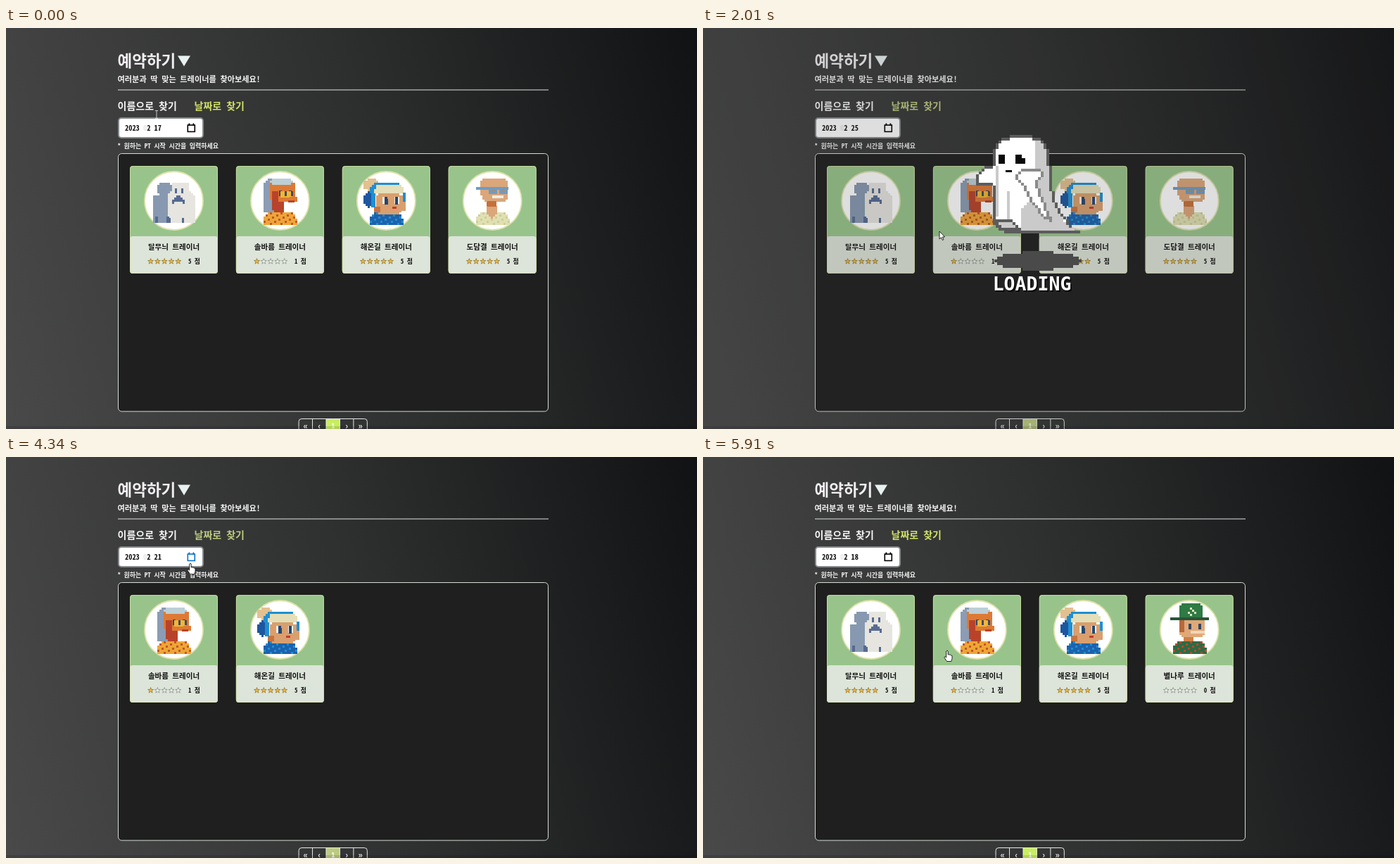
An HTML page for the animation above (6.04 s loop, 982x570 px).

```html
<!DOCTYPE html>
<html lang="ko">
<head>
<meta charset="utf-8">
<title>예약하기</title>
<style>
html, body { margin: 0; width: 100%; height: 100%; overflow: hidden; background: #2e302f; }
svg {
  display: block; width: 982px; height: 570px;
  background: linear-gradient(75deg, #494949 0%, #2e302f 53%, #111214 100%);
  font-family: 'Noto Sans Mono CJK KR', 'Noto Sans CJK KR', 'Noto Sans CJK', monospace;
}
text { white-space: pre; }
.cal { font-family: 'Noto Sans CJK KR', 'Noto Sans CJK', sans-serif; }
.load { font-family: 'DejaVu Sans Mono', monospace; font-weight: bold; }
.mid { text-anchor: middle; }
.bold { font-weight: bold; }
.px { shape-rendering: crispEdges; }
</style>
</head>
<body>
<svg viewBox="0 0 982 570"><defs id="art"></defs><g id="stage"></g></svg>
<script>
const LOOP = 6040, FRAME = 70;
const stage = document.getElementById('stage');

// --- drawing helpers ---
const rect = (x, y, w, h, fill, more = '') =>
  `<rect x="${x}" y="${y}" width="${w}" height="${h}" fill="${fill}" ${more}/>`;
const path = (d, fill, more = '') => `<path d="${d}" fill="${fill}" ${more}/>`;
const group = (x, y, body, more = '') => `<g transform="translate(${x} ${y})" ${more}>${body}</g>`;
const use = (id, x = 0, y = 0) => `<use href="#${id}" x="${x}" y="${y}"/>`;
// y is the visual middle of the line
const text = (x, y, s, size, fill, cls = 'bold') =>
  `<text x="${x}" y="${y + size * 0.37}" font-size="${size}" fill="${fill}" class="${cls}">${s}</text>`;

// --- pixel art: smooth outlines snapped to a grid ---
const probe = document.createElement('canvas').getContext('2d');
const box = (x, y, w, h) => `M${x} ${y}h${w}v${h}h${-w}z`;
const oval = (x, y, rx, ry) => `M${x - rx} ${y}a${rx} ${ry} 0 1 1 ${2 * rx} 0a${rx} ${ry} 0 1 1 ${-2 * rx} 0z`;
const slab = (x, y, w, h) => box(x, y + 3, w, h - 6) + box(x + 3, y, w - 6, h);

function pixels(d, fill, { size = 3, edge = fill, keep = () => true } = {}) {
  const shape = new Path2D(d);
  const inside = (i, j) => probe.isPointInPath(shape, (i + 0.5) * size, (j + 0.5) * size);
  const body = { [fill]: '', [edge]: '' };
  for (let j = 0; j * size < 160; j++) {
    for (let i = 0; i * size < 160; i++) {
      if (!inside(i, j) || !keep(i, j)) continue;
      const core = inside(i - 1, j) && inside(i + 1, j) && inside(i, j - 1) && inside(i, j + 1);
      body[core ? fill : edge] += box(i * size, j * size, size, size);
    }
  }
  return Object.entries(body).map(([color, cells]) => path(cells, color)).join('');
}

const pair = (x, gap, y, w, h, fill) => path(box(x, y, w, h) + box(x + gap, y, w, h), fill);
const every = n => (i, j) => (i + 2 * j) % n === 0;

function bust({ skin, neck, shirt, fleck, low = 0 }) {
  const torso = 'M39 84Q36 66 54 66H72Q88 66 86 84Z';
  return path(box(54, 46, 14, 22), neck) +
    pixels(torso, shirt) + pixels(torso, fleck, { keep: every(5) }) +
    pixels(slab(48, 21 + low, 36, 30), skin) +
    pair(61, 14, 35 + low * 0.7, 4, 8, '#354560');
}

const ART = {
  grey: pixels(slab(39, 23, 21, 18) + box(33, 42, 24, 39), '#8799b0') +
    pixels('M53 81V39L60 36V25H84V36L93 42V81Z', '#e7e5e0') +
    pair(64, 9, 32, 3, 7, '#566b92') +
    pixels('M60 54V48L69 42L78 48V54L69 50Z', '#566b92') +
    pair(36, 16, 72, 4, 9, '#566b92') + pair(55, 19, 74, 3, 7, '#566b92'),

  ponytail: pixels('M39 66V24L48 18H60V66Z', '#8b9cb4') +
    bust({ skin: '#dd7a35', neck: '#b8432a', shirt: '#eda636', fleck: '#c4552b' }) +
    pixels(box(51, 36, 9, 27), '#b8432a') +
    pixels(slab(48, 18, 33, 9), '#bccfd6') +
    path(box(63, 36, 17, 9), '#f2b632') + pair(69, 9, 36, 3, 7, '#3f4a63') +
    path(box(76, 44, 11, 7), '#dd7a35') + path(box(74, 49, 9, 3), '#b8432a'),

  headset: pixels(oval(41, 27, 11, 9), '#e3c090') +
    bust({ skin: '#d99f6e', neck: '#c9743f', shirt: '#1c62ad', fleck: '#1f8fd2', low: 17 }) +
    path(box(83, 42, 7, 22), '#d99f6e') + path(box(45, 58, 9, 8), '#c9743f') +
    pixels('M45 42V30L51 24H81L87 33V39H51Z', '#e4dfb8') +
    pixels('M39 40V31L45 25H80V28H48L43 40Z', '#1f8fd2') +
    pixels(oval(38, 48, 8, 11), '#1c57a0') + path(box(41, 39, 6, 20) + box(86, 38, 4, 13), '#1f8fd2') +
    pair(57, 17, 44, 7, 10, '#f4efe6') + pair(60, 15, 44, 4, 11, '#24466f') +
    path(box(71, 58, 6, 3), '#c83a32'),

  glasses: bust({ skin: '#dba67a', neck: '#c4703a', shirt: '#dfe0b2', fleck: '#cfcd98' }) +
    pixels(slab(45, 18, 40, 28), '#dba67a') +
    pixels('M54 66V57H69V66L62 75Z', '#dba67a') + path(box(55, 50, 13, 8), '#c4703a') +
    path(box(39, 30, 46, 4), '#6f9cc4') + pair(57, 15, 30, 12, 10, '#6f9cc4') +
    pair(60, 15, 33, 6, 4, '#9c917f') + path(box(62, 42, 16, 4), '#f0ece0'),

  cap: bust({ skin: '#e0a878', neck: '#cf8046', shirt: '#2f6a42', fleck: '#b8482e', low: 8 }) +
    path(box(48, 36, 7, 17), '#b8683a') + path(box(64, 51, 20, 4), '#f0d6b8') +
    pixels(slab(47, 13, 33, 22), '#2f7a45') + path(box(35, 32, 55, 4), '#27553a') +
    pixels(oval(68, 24, 7, 7), '#dfe6c0', { keep: every(3) }),

  ghost: pixels('M28 44V24Q34 0 70 0Q106 0 109 34L114 80Q120 114 153 140H46L28 128V72H2Q2 46 28 44Z',
      '#fff', { size: 4, edge: '#5c5c5c' }) +
    pixels('M88 6Q103 10 105 36L110 82Q116 114 144 135H68V104Q94 90 88 48Z', '#c9cac9', { size: 4 }) +
    pixels(box(32, 44, 4, 72) + box(48, 82, 4, 36), '#c9cac9', { size: 4 }) +
    pixels('M60 60Q66 46 84 47Q99 46 99 60Q90 62 92 72Q104 100 113 126Q92 116 68 70Z',
      '#fff', { size: 4, edge: '#8a8a8a' }) +
    pixels('M28 120H56L68 136H40Z', '#c9cac9', { size: 4, edge: '#5c5c5c' }) +
    pair(36, 24, 28, 9, 13, '#0a0a0a') + path(box(66, 33, 8, 8) + box(46, 50, 9, 3), '#0a0a0a'),

  shade: pixels(oval(62, 14, 62, 13), '#4a4a4a', { size: 4 })
};
document.getElementById('art').innerHTML = Object.entries(ART)
  .map(([id, body]) => `<g id="${id}" class="px">${body}</g>`).join('');

const trainer = (name, art, stars) => ({ name, art, stars });
const A = trainer('달무늬', 'grey', 5);
const B = trainer('솔바름', 'ponytail', 1);
const C = trainer('해온길', 'headset', 5);
const D = trainer('도담결', 'glasses', 5);
const E = trainer('별나루', 'cap', 0);

// --- timeline: each round opens the calendar, picks a day, then loads a list ---
const START = { day: 17, list: [A, B, C, D] };
const ROUNDS = [
  { open: 660, pick: 1940, done: 2490, day: 25, list: [] },
  { open: 3020, pick: 3800, done: 4340, day: 21, list: [B, C] },
  { open: 4750, pick: 5630, done: 5910, day: 18, list: [A, B, C, E] }
];
const ICON = [268, 143];
const MOVES = [
  { from: 70, to: 400, via: [[214, 123], ICON] },
  { from: 1060, to: 1660, via: [ICON, [322, 272], [339, 309], [336, 299]] },
  { from: 1730, to: 1800, via: [[336, 299], [336, 289]] },
  { from: 2560, to: 2950, via: [[336, 289], [318, 337], ICON] },
  { from: 3170, to: 3720, via: [ICON, [297, 311], [200, 291]] },
  { from: 3870, to: 4340, via: [[200, 291], [262, 151]] },
  { from: 4410, to: 4550, via: [[262, 151], [262, 145]] },
  { from: 4820, to: 5300, via: [[262, 145], [424, 322], [347, 275]] }
];

function stateAt(t) {
  const s = { ...START, open: false, busy: false, click: false, since: 0 };
  for (const r of ROUNDS) {
    const load = r.pick + FRAME;
    if (t >= load) s.day = r.day;
    if (t >= r.done) s.list = r.list;
    if (t >= load && t < r.done) { s.busy = true; s.since = t - load; }
    s.open ||= t >= r.open + FRAME && t < load;
    s.click ||= [r.open, r.pick].some(c => t >= c && t < c + FRAME);
  }
  return s;
}

function pointer(t) {
  const move = MOVES.filter(m => t >= m.from).pop();
  if (!move) return MOVES[0].via[0];
  const { from, to, via } = move;
  const last = Math.round((to - from) / FRAME);
  const step = Math.min(last, Math.floor((t - from) / (to - from) * last));
  const u = (step + 1) / (last + 1) * (via.length - 1);
  const i = Math.min(via.length - 2, Math.floor(u));
  return via[i].map((v, k) => +(v + (via[i + 1][k] - v) * (u - i)).toFixed(1));
}

// --- page parts ---
function header(accent) {
  return text(158.5, 46.5, '예약하기', 22.5, '#f1eef2') +
    path('M244 39.5H262L253 54.5Z', '#e8f0f0') +
    text(158.5, 73, '여러분과 딱 맞는 트레이너를 찾아보세요!', 11.2, '#f4f4f4') +
    rect(159, 87.5, 612, 1, '#dfe3e1') +
    text(158.5, 111, '이름으로 찾기', 14, '#f6f6f6') +
    text(267.5, 111, '날짜로 찾기', 14, accent) +
    text(158.5, 168, '* 원하는 PT 시작 시간을 입력하세요', 9, '#f4f4f4');
}

function dateField(day, hot) {
  const ink = hot ? '#0b72cc' : '#000';
  return rect(160, 128, 120, 28, '#fff', 'rx="4" stroke="#858a8d" stroke-width="2"') +
    text(169, 142, `2023 <tspan fill="#e6e6e6">0</tspan>2 ${day}`, 10.4, '#111') +
    rect(258.3, 138, 10, 9.4, 'none', `stroke="${ink}" stroke-width="1.6"`) +
    pair(259.5, 6, 135.6, 1.8, 3, ink);
}

const starPath = Array.from({ length: 10 }, (_, i) => {
  const r = i % 2 ? 1.7 : 4.2, a = i * Math.PI / 5;
  return (i ? 'L' : 'M') + (r * Math.sin(a)).toFixed(2) + ' ' + (-r * Math.cos(a)).toFixed(2);
}).join('') + 'Z';

function card({ name, art, stars }, i) {
  let out = rect(0, 0, 125, 153, '#98c48b', 'rx="4"') +
    rect(0, 100, 125, 53, '#dde4d9', 'rx="4"') +
    rect(0.5, 0.5, 124, 152, 'none', 'rx="4" stroke="#d6dda4" stroke-width=".8"') +
    `<circle cx="62.5" cy="49.5" r="41.5" fill="#fff" stroke="#dde2aa" stroke-width="1.8"/>` +
    use(art) + text(62.5, 115, name + ' 트레이너', 10.55, '#111', 'mid bold');
  for (let s = 0; s < 5; s++) {
    const on = s < stars;
    out += group(29.6 + s * 9.8, 135.8, path(starPath, on ? '#f0b73c' : '#eef2ea',
      `stroke="${on ? '#86702f' : '#7d857c'}" stroke-width=".7"`));
  }
  return group(176 + i * 150.9, 196, out + text(83, 135.5, stars + ' 점', 8.85, '#111'));
}

function pager(full, accent) {
  const labels = full ? ['«', '‹', '1', '›', '»'] : ['«', '‹', '›', '»'];
  const w = 19.45, x0 = 464.7 - labels.length * w / 2;
  let out = '';
  labels.forEach((s, i) => {
    const x = x0 + i * w;
    if (s === '1') out += rect(x, 555, w, 20, accent);
    if (i) out += rect(x - 0.5, 555, 1, 20, '#e6eae8');
    out += text(x + w / 2, 565.5, s, s === '1' ? 9.5 : 12, '#fff', 'mid bold cal');
  });
  return out + rect(x0, 555.5, labels.length * w, 24, 'none', 'rx="4" stroke="#e6eae8"');
}

// --- calendar ---
const CAL = { x: 161.5, y: 212, w: 32.4, h: 23.4 };

function cellAt(x, y) {
  const c = Math.floor((x - CAL.x) / CAL.w), r = Math.floor((y - CAL.y) / CAL.h);
  const i = r * 7 + c;
  return c >= 0 && c < 7 && r >= 0 && r < 5 && i >= 18 ? i : -1;
}

function calendar(day, x, y) {
  const hover = cellAt(x, y);
  const overLabel = x > 219 && x < 331 && y > 155 && y < 184;
  let out = rect(161, 155, 227.5, 174.5, '#fff') + rect(161, 155, 58, 29, '#f0f0f0');
  if (overLabel) out += rect(219, 155, 112, 29, '#e6e6e6');
  out += text(274.5, 170.5, '2023년 2월', 9, '#111', 'mid cal');
  ['«', '‹', '›', '»'].forEach((s, i) =>
    out += text(176 + i * 28.6 + (i > 1 ? 112 : 0), 170.5, s, 9.5, i < 2 ? '#a9a9a9' : '#111', 'mid cal'));
  [...'월화수목금토일'].forEach((s, i) =>
    out += text(CAL.x + (i + 0.5) * CAL.w, 203.5, s, 7.6, '#dcdcdc', 'mid cal'));
  for (let i = 0; i < 35; i++) {
    const d = i - 1;
    const label = d < 1 ? 31 + d : d > 28 ? d - 28 : d;
    const cx = CAL.x + i % 7 * CAL.w, cy = CAL.y + Math.floor(i / 7) * CAL.h;
    const past = d < 17, weekend = i % 7 > 4;
    let bg = past ? '#f0f0f0' : '', ink = '#111';
    if (d < 1 || d > 28) ink = '#757575';
    else if (weekend) ink = '#b02222';
    else if (past) ink = '#b6b6b6';
    if (d === START.day) bg = '#ffff76';
    if (i === hover) bg = '#e6e6e6';
    if (d === day) { bg = '#006edc'; ink = '#fff'; }
    if (bg) out += rect(cx, cy, CAL.w, CAL.h, bg, 'class="px"');
    out += text(cx + CAL.w / 2, cy + 11.7, String(label).padStart(2, '0'), 9, ink, 'mid cal');
  }
  return out + rect(161.2, 155.2, 227.2, 174.2, 'none', 'stroke="#a0a096" stroke-width=".8"');
}

function loading(since) {
  const lift = Math.floor(since / (2 * FRAME)) % 2 ? 3 : 0;
  return rect(0, 0, 982, 570, '#313131', 'opacity=".16"') +
    use('shade', 414, 317) + use('ghost', 384, 152 - lift) +
    text(469, 365, 'LOADING', 26.5, '#000', 'mid load') +
    text(467.5, 363.2, 'LOADING', 26.5, '#fff', 'mid load');
}

// --- pointer shapes, hot spot at 0 0 ---
const edged = 'stroke="#111" stroke-width=".9" stroke-linejoin="round"';
const SHAPES = {
  arrow: path('M0 0V11L2.6 8.7L4.3 12.5L6 11.7L4.4 8H7.6Z', '#fff', edged),
  hand: path('M-1.3 1Q0 -.8 1.2 1V6Q2.2 5 3.2 6.2Q4.4 5.5 5.2 6.8Q6.8 6.3 7 8V11.5L5.8 15.5H-.4L-3.8 10.6Q-4.4 8.6 -2.8 8.7L-1.3 10Z', '#fff', edged),
  beam: path('M-2.2 -5.5H2.2M0 -5.5V5.5M-2.2 5.5H2.2', 'none', 'stroke="#c4c8c6" stroke-width="1"')
};

function shapeAt(x, y, onIcon, { open, busy, list }) {
  const col = (x - 176) / 150.9;
  const onCard = !open && !busy && y > 196 && y < 349 && col > 0 && col < list.length && col % 1 < 0.83;
  if (onIcon || onCard || open && cellAt(x, y) >= 0) return 'hand';
  return x > 159 && x < 281 && y > 116 && y < 157 ? 'beam' : 'arrow';
}

function scene(t) {
  const [x, y] = pointer(t);
  const s = stateAt(t);
  const dull = s.busy || s.list.length === 2;
  const onIcon = x > 254 && x < 277 && y > 133 && y < 154;

  return header(dull ? '#bccb80' : '#d2e268') +
    rect(159.5, 178.5, 611, 366.5, '#1e1f1e', 'rx="5" stroke="#d5dcd6"') +
    s.list.map(card).join('') +
    pager(s.list.length, dull ? '#bccb80' : '#c9ee62') +
    rect(0, 566, 982, 4, '#000', 'opacity=".12"') +
    dateField(s.day, onIcon) +
    (s.open ? calendar(s.day, x, y) : '') +
    (s.busy ? loading(s.since) : '') +
    (s.click ? `<circle cx="${x - 0.5}" cy="${y}" r="9.5" fill="#fbf04e" opacity=".75"/>` : '') +
    group(x, y, SHAPES[shapeAt(x, y, onIcon, s)]);
}

let shown = '';
function tick(now) {
  const next = scene(now % LOOP);
  if (next !== shown) stage.innerHTML = shown = next;
  requestAnimationFrame(tick);
}
tick(0);
</script>
</body>
</html>
```
